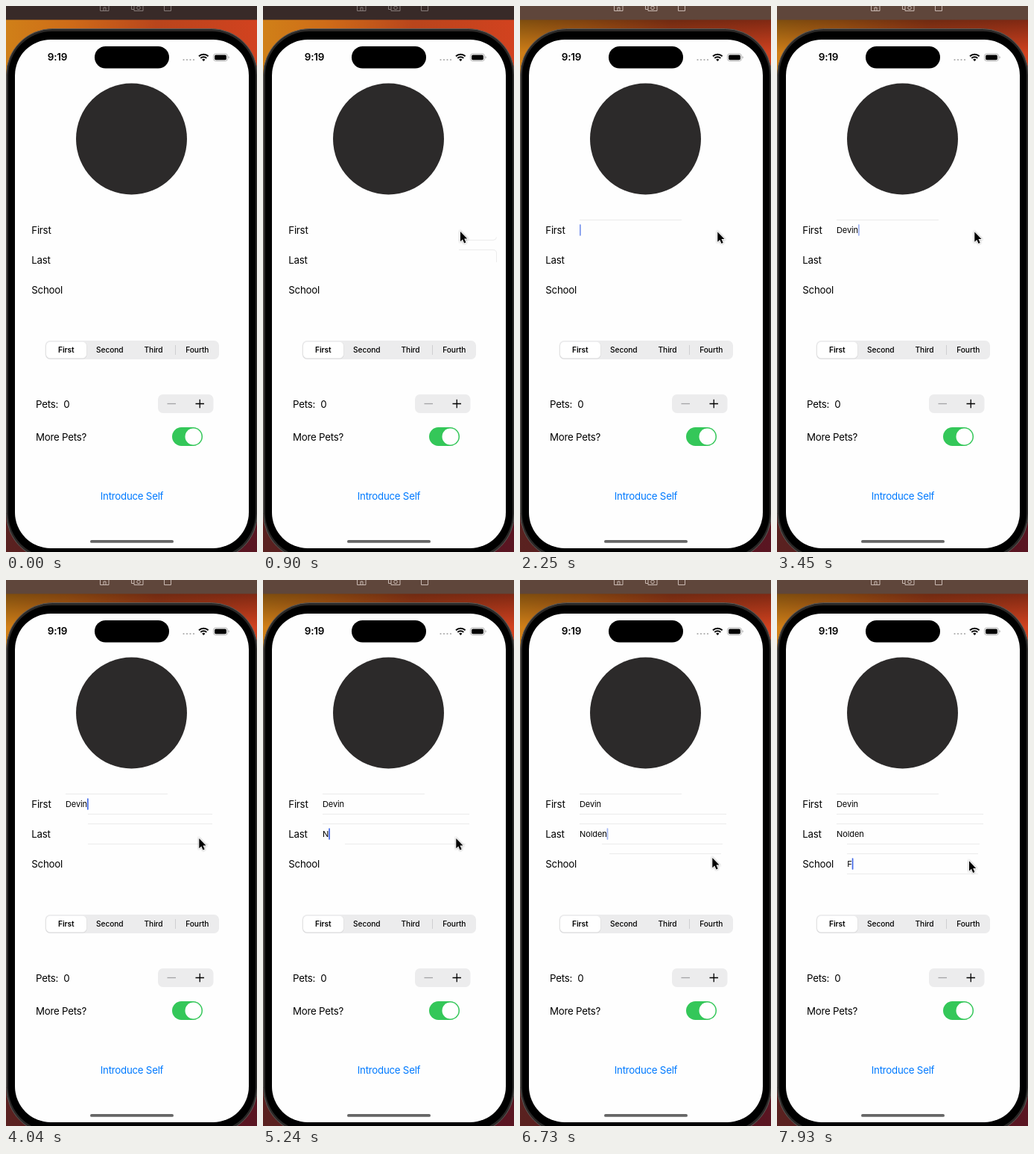
An HTML page that plays this animation: 337 px wide and 731 px high, repeating every 8000 ms.

```html
<!DOCTYPE html>
<html lang="en">
<head>
<meta charset="utf-8">
<title>Introduction form</title>
<style>
  html, body { margin: 0; width: 100%; height: 100%; overflow: hidden; background: #000; }
  svg { display: block; width: 100%; height: 100%; }
  text { font: 13.3px Inter, Roboto, sans-serif; letter-spacing: -.25px; fill: #000; }
  .field { font-size: 11px; letter-spacing: -.1px; }
  .segment { font-size: 10.2px; font-weight: 500; letter-spacing: -.1px; text-anchor: middle; }
  .selected { font-weight: 600; }
  .time { font-size: 13.5px; font-weight: 600; text-anchor: middle; }
  .link { fill: #007aff; text-anchor: middle; }
  .line { fill: none; stroke: #ebebeb; }
  #pointer { filter: drop-shadow(0 .8px .8px #0006); }
</style>
</head>
<body>
<svg viewBox="0 0 337 731">
  <defs>
    <linearGradient id="wallpaper">
      <stop offset="0" stop-color="#d08018"/>
      <stop offset=".25" stop-color="#cf6c18"/>
      <stop offset=".6" stop-color="#b9451c"/>
      <stop offset="1" stop-color="#d2421f"/>
    </linearGradient>
    <linearGradient id="dusk" x2="0" y2="1">
      <stop offset=".2" stop-color="#3c0a22" stop-opacity="0"/>
      <stop offset=".85" stop-color="#3c0a22" stop-opacity=".8"/>
    </linearGradient>
    <linearGradient id="shade" x2="0" y2="1">
      <stop offset="0" stop-opacity=".4"/>
      <stop offset="1" stop-opacity="0"/>
    </linearGradient>
  </defs>

  <!-- Desktop and simulator toolbar -->
  <rect width="337" height="731" fill="url(#wallpaper)"/>
  <rect width="337" height="731" fill="url(#dusk)"/>
  <rect id="shadow" y="18" width="337" height="45" fill="url(#shade)"/>
  <rect id="toolbar" width="337" height="18.5"/>
  <g id="icons" fill="none">
    <path d="M126.5-1V6.5H138V-1M131 6V2h3v4"/>
    <path d="M168.5-1V4.5H172M172 0V6.5H184V0"/>
    <circle cx="178" cy="2.5" r="2.3"/>
    <path d="M212.5-1V6.5H221.5V-1"/>
  </g>

  <!-- Phone -->
  <rect x=".5" y="30.5" width="337" height="711" rx="62" fill="#2a2827" stroke="#5d5a57"/>
  <rect x="3" y="34" width="332" height="704" rx="59" fill="#000"/>
  <rect x="12" y="45" width="314" height="681" rx="48" fill="#fefefe"/>
  <rect x="119" y="54" width="100" height="29.5" rx="14.75"/>
  <text class="time" x="69" y="73.3">9:19</text>
  <g fill="#aaa">
    <circle cx="238.5" cy="72" r="1.1"/><circle cx="243" cy="72" r="1.1"/>
    <circle cx="247.5" cy="72" r="1.1"/><circle cx="252" cy="72" r="1.1"/>
  </g>
  <path d="M259 67.3a9 9 0 0 1 12.6 0M261.3 69.9a5.6 5.6 0 0 1 8 0" fill="none" stroke="#000" stroke-width="1.9"/>
  <path d="M263.2 71.8a3 3 0 0 1 4.2 0l-2.1 2.2z"/>
  <rect x="278.5" y="64" width="19" height="9.6" rx="3" fill="none" stroke="#aaa" stroke-width=".9"/>
  <rect x="280" y="65.4" width="16" height="6.8" rx="1.8"/>
  <path d="M298.6 67v3.4q1.2-.5 1.2-1.7t-1.2-1.7" fill="#aaa"/>
  <rect x="113" y="715" width="112" height="3.8" rx="1.9" fill="#666"/>

  <!-- Form -->
  <circle cx="168.5" cy="178" r="74.5" fill="#2c2a2a"/>
  <text x="34.3" y="305">First</text>
  <text x="34.3" y="345">Last</text>
  <text x="34.3" y="385">School</text>

  <rect x="52.5" y="448" width="233.5" height="25" rx="6.5" fill="#ececed"/>
  <rect x="53.5" y="449.5" width="55" height="23" rx="5.5" fill="#d9d9da"/>
  <rect x="54" y="449.5" width="54" height="22" rx="5.2" fill="#fff"/>
  <path d="M227.5 454v13" stroke="#cfcfd1"/>
  <text class="segment selected" x="80.8" y="464.3">First</text>
  <text class="segment" x="139.3" y="464.3">Second</text>
  <text class="segment" x="198" y="464.3">Third</text>
  <text class="segment" x="256.8" y="464.3">Fourth</text>

  <text x="40" y="537.5">Pets:</text>
  <text x="77.3" y="537.5">0</text>
  <rect x="204" y="520" width="74.5" height="25" rx="6.5" fill="#ececed"/>
  <path d="M216.5 532.5h11.5" stroke="#a3a3a5" stroke-width="1.3"/>
  <path d="M254.5 532.5h11.5M260.25 526.8v11.5" stroke="#000" stroke-width="1.3"/>

  <text x="40" y="581.5">More Pets?</text>
  <rect x="223" y="564" width="41" height="25" rx="12.5" fill="#34c759"/>
  <circle cx="251.5" cy="576.5" r="11" fill="#fff"/>
  <text class="link" x="169" y="660.7">Introduce Self</text>

  <!-- Input -->
  <g id="lines"></g>
  <text class="field" id="first" x="80" y="304"></text>
  <text class="field" id="last" x="80" y="344"></text>
  <text class="field" id="school" x="94.3" y="384"></text>
  <rect id="caret" width="1.7" height="15.5" rx=".8" fill="#4268e6"/>
  <path id="pointer" d="M0 0V13.2L3 10.5L5.2 15.6L7.4 14.6L5.2 9.6H9.2Z" stroke="#fff" stroke-width="1.6" paint-order="stroke"/>
</svg>

<script>
const LOOP = 8000;
const ACTIVATE = 1050;
const FOCUS = 1200;
const get = id => document.getElementById(id);

// Latest entry whose leading time has passed
const latest = (entries, time) => entries.findLast(entry => entry[0] <= time);

const fields = [
  { id: "first", value: "Devin", starts: [2400, 2550, 2700, 2850, 3000] },
  { id: "last", value: "Nolden", starts: [5240, 5540, 5690, 5840, 5990, 6130] },
  { id: "school", value: "F", starts: [7930] }
];

// time, field index, opacity
const caretSteps = [
  [0, 0, 0], [FOCUS, 0, 1], [1800, 0, .5], [1950, 0, 0], [2250, 0, .7], [2400, 0, 1],
  [3450, 0, .5], [3590, 0, 0], [3890, 0, .7], [4040, 0, 1],
  [4340, 1, 1], [4790, 1, .5], [4940, 1, 0], [5240, 1, 1],
  [6730, 1, .5], [6880, 1, 0],
  [7180, 2, 1], [7780, 2, .5], [7930, 2, 1]
];

// time, x, y
const pointerSteps = [
  [0, 400, 326], [450, 333, 326], [600, 322, 326], [750, 303, 326], [900, 265, 302],
  [ACTIVATE, 265.3, 302.5], [3590, 263, 316], [3740, 261, 332], [3890, 259.3, 346],
  [6730, 258.3, 372], [6880, 258.3, 376], [7030, 258.3, 378], [7180, 258, 376.3]
];

// start, end, path
const lines = [
  [900, ACTIVATE, "M263 313.5H309q4 0 4.5-4"],
  [900, ACTIVATE, "M263 326.5H309q4.5 0 4.5 4.5V343"],
  [FOCUS, LOOP, "M80 286.5H217"],
  [3590, LOOP, "M110 313.5H277M110 326.5H277"],
  [3890, LOOP, "M110 353.5H272"],
  [4340, LOOP, "M80 313.5H110M80 326.5H110"],
  [6730, LOOP, "M120 366.5H270"],
  [7180, LOOP, "M94 353.5H110M94 366.5H120M94 393.5H270"]
].map(([start, end, d]) => {
  const path = document.createElementNS("http://www.w3.org/2000/svg", "path");
  path.setAttribute("class", "line");
  path.setAttribute("d", d);
  get("lines").append(path);
  return { start, end, path };
});

function draw(time) {
  const active = time >= ACTIVATE;
  get("toolbar").setAttribute("fill", active ? "#5f463b" : "#382a28");
  get("icons").setAttribute("stroke", active ? "#c9b9b2" : "#857a78");
  get("shadow").setAttribute("opacity", active ? 1 : 0);

  for (const { start, end, path } of lines)
    path.setAttribute("visibility", time >= start && time < end ? "visible" : "hidden");

  for (const { id, value, starts } of fields)
    get(id).textContent = value.slice(0, starts.filter(start => start <= time).length);

  const [, index, opacity] = latest(caretSteps, time);
  const field = get(fields[index].id);
  const textEnd = +field.getAttribute("x") + field.getComputedTextLength();
  get("caret").setAttribute("x", textEnd);
  get("caret").setAttribute("y", field.getAttribute("y") - 11.8);
  get("caret").setAttribute("opacity", opacity);

  const [, x, y] = latest(pointerSteps, time);
  get("pointer").setAttribute("transform", `translate(${x} ${y})`);
}

const origin = performance.now();
function frame() {
  draw((performance.now() - origin) % LOOP);
  requestAnimationFrame(frame);
}
frame();
</script>
</body>
</html>
```
